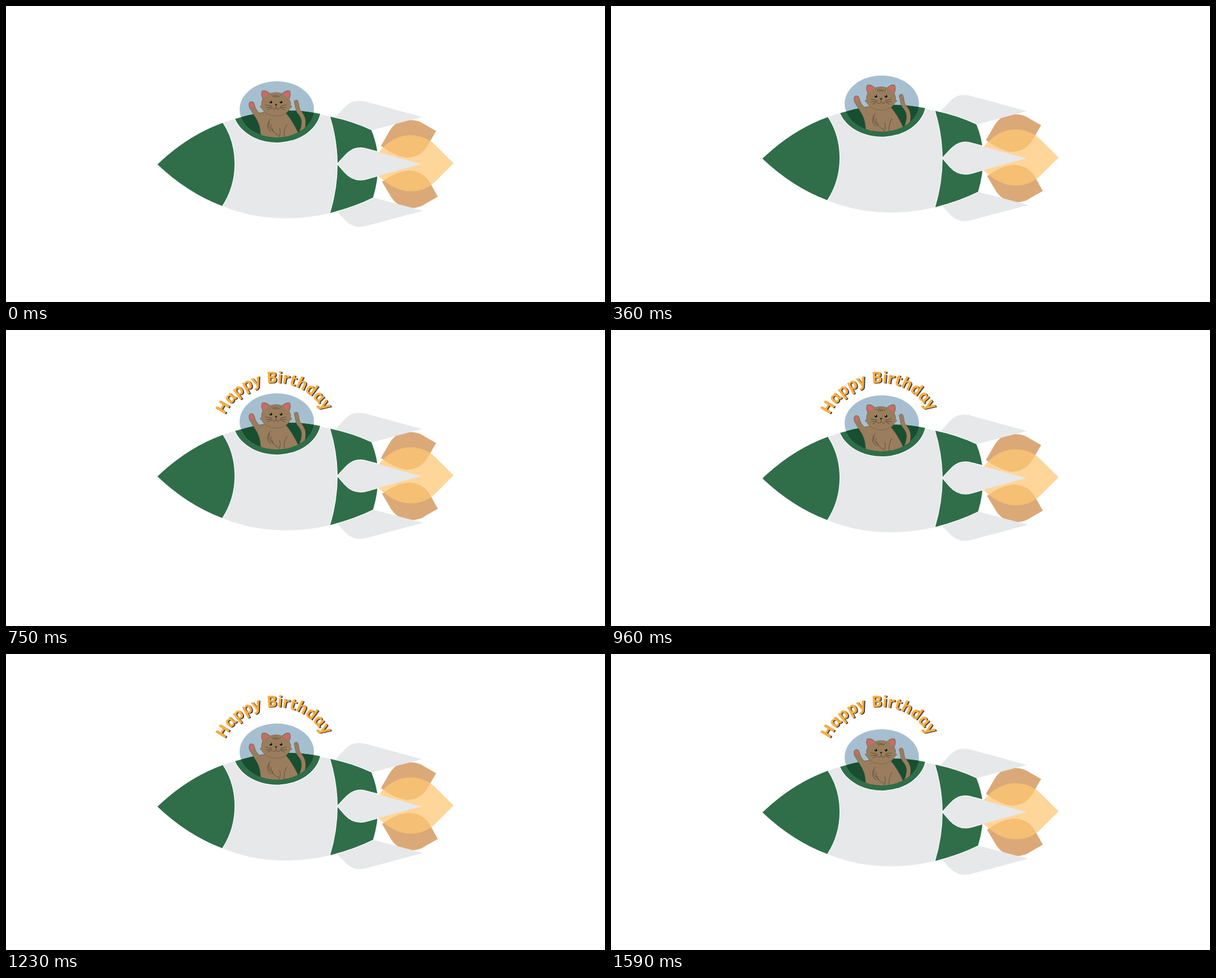
Animation, 1064 px wide and 527 px high, one loop 1.66 s. Source, as an HTML page:

```html
<!DOCTYPE html>
<html lang="en">
<head>
<meta charset="utf-8">
<title>Birthday rocket</title>
<style>
  html, body { margin: 0; width: 100%; height: 100%; overflow: hidden; background: #fff; }
  svg { display: block; width: 100vw; height: 100vh; }
  .green { fill: #2f6e49; }
  .grey { fill: #e6e8ea; }
  .edge { stroke: #fff; stroke-width: 2.2; paint-order: stroke; }
  .brown { fill: #dba978; }
  .fur { fill: #997d5d; stroke: #6b5643; stroke-width: .6; }
  .pink { fill: #d9646b; }
  .line { fill: none; stroke: #4b3b30; stroke-width: .7; stroke-linecap: round; }
  text { font: bold 28px "Noto Sans", "Open Sans", sans-serif; letter-spacing: -.3px; word-spacing: 2px; }
</style>
</head>
<body>
<svg viewBox="0 0 1064 527">
  <defs>
    <path id="arc" d="M379.500,192.500 A98.500,98.500 0 0 1 576.500,192.500"/>
    <path id="bowl" d="M407,201 A78,61 0 0 0 558,192 Q483,177 407,201Z"/>
    <path id="tail" d="M525,224 C532,206 528,197 521,189 C516,183 518,177 515.500,171"/>
    <clipPath id="inBowl"><use href="#bowl"/></clipPath>
    <clipPath id="inDome"><ellipse cx="481" cy="184" rx="66" ry="50"/></clipPath>
    <g id="eye">
      <circle r="3" fill="#c2a36b"/>
      <circle r="2.5" fill="#111"/>
      <circle cx="-.8" cy="-1" r=".8" fill="#fff"/>
    </g>
  </defs>

  <g id="rocket">
    <!-- flames -->
    <path class="brown" d="M666,249 L681,223 Q694,201 718,203 Q733,203 743,210.500 L764,222.500 L751,245 Q738,270 711,270 Q690,267 666,249Z"/>
    <path class="brown" d="M668,313 L684,340 Q697,360 721,360 Q736,359 746,351.500 L767,339.500 L754,316 Q742,294 716,293 Q694,294 668,313Z"/>
    <path fill="#ffc773" fill-opacity=".73" d="M644,281 L661,262 Q685,231 717,230 Q745,230 763,248 L795,280 L763,312 Q745,330 718,330 Q690,330 661,302Z"/>

    <!-- outer fins -->
    <path class="grey" d="M586,197 L602,180 C612,169 624,166 642,171 L739,197.500 L650,221 L588,215Z"/>
    <path class="grey" d="M587,365 L602,381 C613,392 624,396 642,391 L741,364.500 L652,341 L590,350Z"/>

    <!-- hull -->
    <ellipse cx="481" cy="184" rx="66" ry="50" fill="#a6bfd0"/>
    <path class="grey" d="M385,208 C440,188 510,180 576,197 Q589,240 589,282 Q589,325 576,368.500 C515,383 445,382 384,356 Q406,322 406,281 Q406,240 385,208Z"/>
    <path class="green edge" d="M269,282 Q322,231 385,208 Q406,240 406,281 Q406,322 384,356 Q322,332.500 269,282Z"/>
    <path class="green edge" d="M576,197 Q615,205 649,221 Q661,250 661,280 Q661,312 652,341 Q620,357 576,368.500 Q589,325 589,282 Q589,240 576,197Z"/>
    <path class="edge" fill="none" d="M661,260 L642,255 C624,249 612,256 602,267 L589,281 L602,296 C612,307 624,313 642,307.500 L661,302"/>
    <path class="grey" d="M589,281 L602,267 C612,256 624,249 642,255 L738,281.500 L642,307.500 C624,313 612,307 602,296Z"/>

    <!-- cockpit -->
    <path class="edge" fill="none" d="M407,201 A78,61 0 0 0 558,192"/>
    <use href="#bowl" class="green"/>
    <ellipse cx="481" cy="184" rx="66" ry="50" fill="#174f30" clip-path="url(#inBowl)"/>

    <!-- cat -->
    <g clip-path="url(#inDome)">
      <g fill="none" stroke-linecap="round">
        <use href="#tail" stroke="#6b5643" stroke-width="7.600"/>
        <use href="#tail" stroke="#997d5d" stroke-width="6.600"/>
      </g>
      <path class="fur" d="M452,240 Q454,218 446,203 L433,182 C430,174 432,170 436,170 Q440,170 441,174 Q443,185 451,191 Q459,188 466,188 L496,189 Q509,204 520,228 L518,240Z"/>
      <ellipse class="pink" cx="436.500" cy="176" rx="3" ry="4.500" transform="rotate(-15 436.500 176)"/>
      <path class="line" d="M470,201 Q463,208 465,217 Q467,222 471,224 M468,206 Q464,214 470,219 M471,211 Q469,219 475,224 M473,218 Q474,226 484,230 M485,233 Q489,224 486,218 M494,233 Q493,219 499,211"/>
      <path class="fur" d="M455,151 Q462,149 469,156 Q480,152 490,156 Q498,149 504,151 Q507,158 503,166 Q507,172 505,177 L508,179 L504,183 Q498,195 480,196 Q461,195 455,183 L451,179 L454,177 Q453,171 456,165 Q452,158 455,151Z"/>
      <path class="pink" d="M456,152.500 Q462,152 467,157.500 Q461,160 458,164 Q455,158 456,152.500Z M503,152.500 Q497,152 492,157.500 Q498,160 501,164 Q504,158 503,152.500Z"/>
      <path class="line" d="M472,159 Q476,163 480,161 Q484,163 488,159 M475,158 Q478,161 482,159"/>
      <use href="#eye" x="470.500" y="171"/>
      <use href="#eye" x="488.500" y="171"/>
      <path fill="#2b1f1a" d="M477.500,174.500 H482 L479.800,178Z"/>
      <path class="line" d="M479.800,178 V181 Q478,185 474,183 M479.800,181 Q482,185 486,183"/>
      <path class="line" d="M472,178 L461,176 M472,180 L462,181 M473,181 L465,185 M488,178 L498,176 M488,180 L498,181 M487,181 L495,185"/>
    </g>
  </g>

  <g id="greeting" aria-label="Happy Birthday">
    <text fill="#45404a" transform="translate(2 1)"><textPath href="#arc" startOffset="42">Hɑppy Birthdɑy</textPath></text>
    <text fill="#fbaf3f"><textPath href="#arc" startOffset="42">Hɑppy Birthdɑy</textPath></text>
  </g>
</svg>
<script>
  const LOOP = 1660, STEP = 30, LAST = 53, RISE = 22.5, GREETING_AT = 390;
  const rocket = document.getElementById('rocket');
  const greeting = document.getElementById('greeting');
  const start = performance.now();

  function draw(now) {
    const t = Math.max(0, now - start) % LOOP;
    const phase = Math.min(Math.floor(t / STEP), LAST) / LAST;
    const lift = RISE * (1 - Math.abs(1 - 2 * phase));
    rocket.setAttribute('transform', `translate(0 ${-lift})`);
    greeting.setAttribute('visibility', t < GREETING_AT ? 'hidden' : 'visible');
    requestAnimationFrame(draw);
  }
  draw(start);
</script>
</body>
</html>
```
